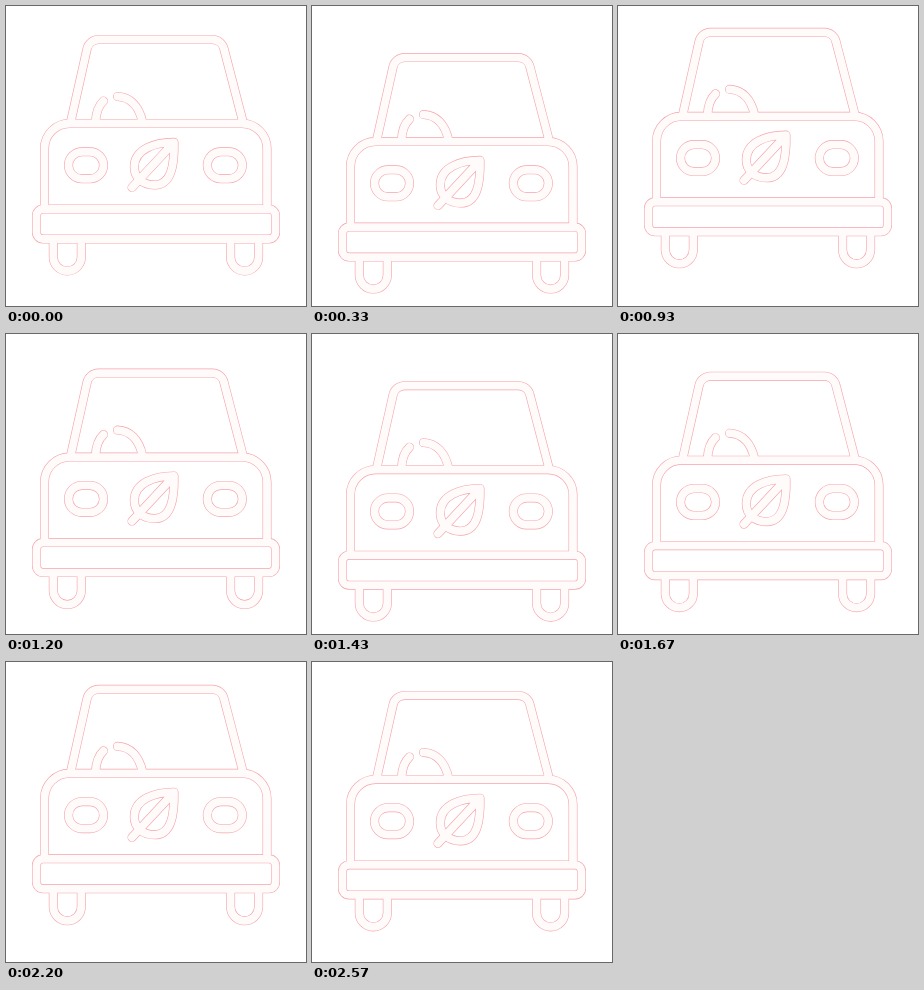
These frames come from a looping animation (300x300 px, 2610 ms). An HTML page with a canvas:

```html
<!DOCTYPE html>
<html lang="en">
<head>
<meta charset="utf-8">
<title>Eco car</title>
<style>
html, body { margin: 0; width: 100%; height: 100%; overflow: hidden; background: #fff; }
canvas { display: block; width: 300px; height: 300px; }
</style>
</head>
<body>
<canvas id="stage"></canvas>
<script>
const LOOP = 2610;
const canvas = document.getElementById('stage');
const ctx = canvas.getContext('2d');
const scale = window.devicePixelRatio || 1;
canvas.width = canvas.height = 300 * scale;

// Vertical bounce: [time in ms, offset in px]
const bounce = [
  [0, 0], [285, 19], [330, 18.1], [530, 2.5], [570, 0.6], [835, -8], [930, -7.2],
  [1070, -2], [1430, 18.1], [1480, 19], [1600, 12.7], [1930, -5], [2050, -8],
  [2130, -7.2], [2610, 0]
];

const slope = i => (bounce[i + 1][1] - bounce[i][1]) / (bounce[i + 1][0] - bounce[i][0]);

// Monotone tangents: flat at turning points and at both ends.
const tangents = bounce.map((_, i) => {
  if (i === 0 || i === bounce.length - 1) return 0;
  const a = slope(i - 1), b = slope(i);
  return a * b <= 0 ? 0 : 2 * a * b / (a + b);
});

function offsetAt(time) {
  let i = 0;
  while (time >= bounce[i + 1][0]) i++;
  const [t0, y0] = bounce[i], [t1, y1] = bounce[i + 1];
  const span = t1 - t0, u = (time - t0) / span, v = 1 - u;
  return y0 * (1 + 2 * u) * v * v + tangents[i] * span * u * v * v
       + y1 * u * u * (3 - 2 * u) - tangents[i + 1] * span * u * u * v;
}

const car = new Path2D();
const add = d => car.addPath(new Path2D(d));

function roundRect(x, y, w, h, r) {
  const shape = new Path2D();
  shape.roundRect(x, y, w, h, r);
  car.addPath(shape);
}

// Cabin and body
add('M64.7 116 L81 43 A12 12 0 0 1 92.7 33.5 H206.3 A12 12 0 0 1 218 43 L237 116');
add('M38.5 201 V142.5 A25 25 0 0 1 63.5 117.5 H236 A25 25 0 0 1 261 142.5 V201');
// Steering wheel
add('M89.5 116 C90 106 92 100 97.5 95');
add('M111.5 90.5 C124 91 133 100 136.5 116');
// Bumper, lights and wheels
roundRect(30.5, 203, 239, 30, 6.5);
for (const x of [62.5, 201.3]) roundRect(x, 145.8, 35, 27, 13.5);
for (const x of [47.3, 224.6]) {
  add(`M${x} 234 V251 a14 14 0 0 0 28 0 V234`);
}
// Leaf
add('M168 136.3 C149 136.3 128.3 143 128.3 161 C128.3 172 137 179 148.5 179 C165 179 168.5 160 168 136.3 Z');
add('M126 181.5 L167 137.5');

function strokeCar(color, width) {
  ctx.strokeStyle = color;
  ctx.lineWidth = width;
  ctx.stroke(car);
}

function draw(now) {
  ctx.setTransform(scale, 0, 0, scale, 0, 0);
  ctx.fillStyle = '#fff';
  ctx.fillRect(0, 0, 300, 300);
  ctx.translate(0, offsetAt(now % LOOP));
  ctx.lineCap = ctx.lineJoin = 'round';
  strokeCar('#f5a3aa', 9);
  strokeCar('#fffbfa', 7.8);
}

const start = performance.now();
function tick() {
  draw(performance.now() - start);
  requestAnimationFrame(tick);
}
tick();
</script>
</body>
</html>
```
